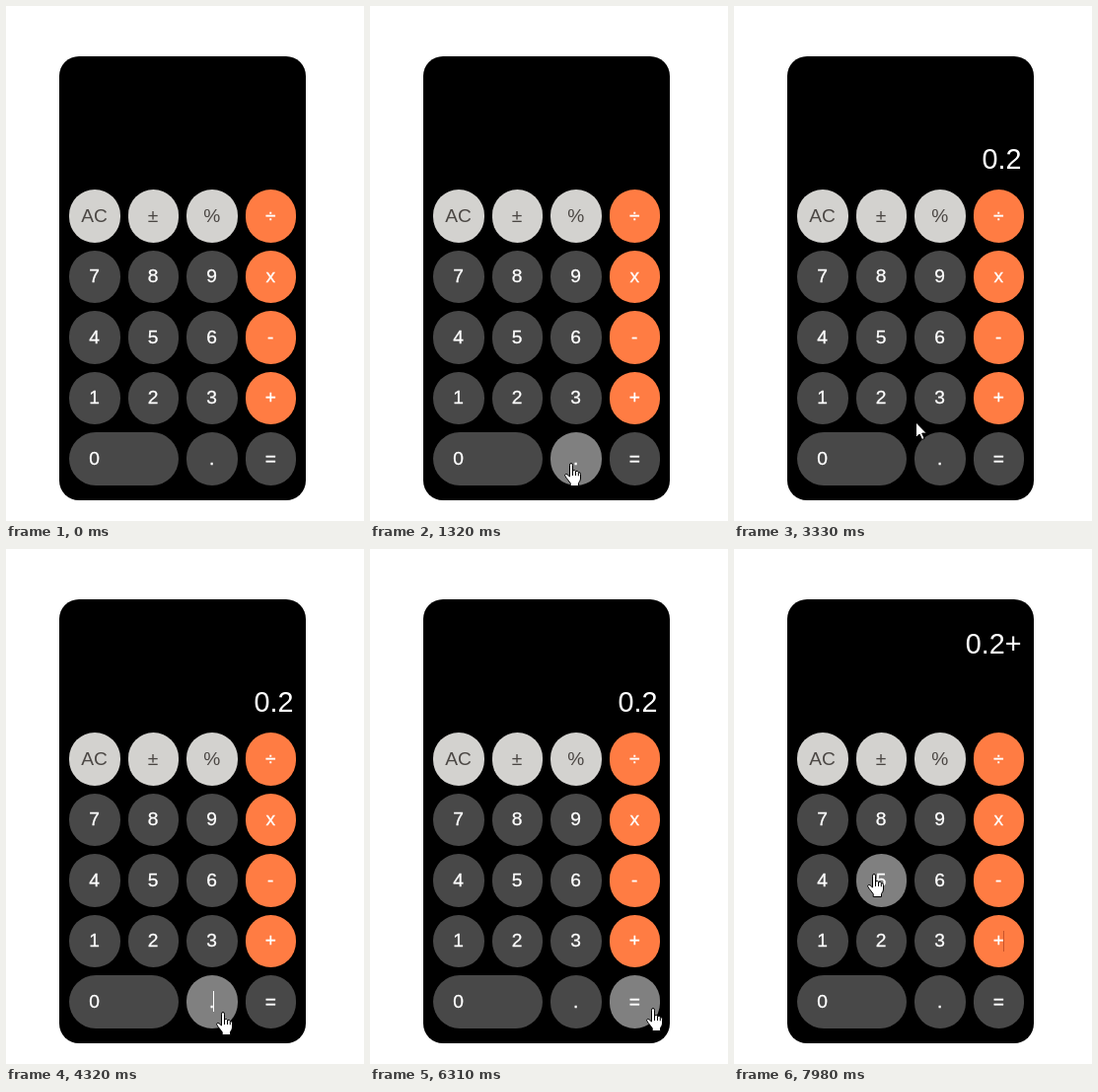
Recreate the animation shown at these times as an HTML page. Size 363 by 522 pixels, loop 8000 ms.

```html
<!DOCTYPE html>
<html lang="en">
<head>
<meta charset="utf-8">
<title>Calculator</title>
<style>
  html, body { margin: 0; width: 100%; height: 100%; overflow: hidden; background: #fff; }
  svg { display: block; width: 363px; height: 522px; }
  text { font-family: "Liberation Sans", Arial, sans-serif; }
  .key { font-size: 19.2px; fill: #fff; stroke: #fff; stroke-width: .3; }
  .key.light { fill: #4b4744; stroke: none; }
  .display { font-size: 28.8px; fill: #fff; text-anchor: end; }
</style>
</head>
<body>
<svg id="stage" viewBox="0 0 363 522">
  <rect x="54" y="51" width="250" height="450" rx="20"/>
  <g id="keys"></g>
  <text id="previous" class="display" x="291.5" y="106"></text>
  <text id="current" class="display" x="291.5" y="165"></text>
  <rect id="dotCaret" x="210" y="448" width="1" height="21" fill="#fff"/>
  <rect id="plusCaret" x="273" y="387" width="1" height="21" fill="#c8532a"/>
  <g id="arrow">
    <path d="M.5 .9V16.4L4.1 13 6.6 18.5 9.1 17.4 6.7 12.1H11.4Z" fill="#fff" stroke="#000"/>
  </g>
  <g id="hand" fill="#fff" stroke="#000" stroke-linejoin="round">
    <path d="M5.5 14V2.2Q5.5 .5 7 .5T8.5 2.2V8Q11 6.6 11.5 8.6 14 7.6 14.3 9.6 16.5 9.2 16.5 11.5V16Q16.5 18 14.5 20.5V23.5H6.2V20.6L2.2 15.4Q.5 13 .6 12.2 1.6 10.6 3.2 12Z"/>
    <path d="M8.5 8V13M11.5 8.8V13M14.3 9.8V13.3" fill="none"/>
  </g>
  <circle id="click" r="12" fill="#ff0" fill-opacity=".47"/>
</svg>
<script>
const LOOP = 8000;
const SVG = "http://www.w3.org/2000/svg";
const $ = id => document.getElementById(id);
const COLORS = { light: "#d3d2cf", dark: "#484848", orange: "#ff7c43", hover: "#808080" };

// start, cursor, x, y, hovered key, mouse down
const pointer = [
  [0, ""],
  [330, "arrow", 312, 482],
  [660, "hand", 257, 402, "+"],
  [990, "arrow", 165, 451],
  [1320, "hand", 197, 463, "."],
  [1650, "hand", 198, 464, ".", true],
  [1990, "hand", 198, 464, "."],
  [2320, "arrow", 177, 413],
  [2650, "hand", 144, 405, "2", true],
  [2980, "hand", 144, 405, "2"],
  [3330, "arrow", 184, 421],
  [3660, "hand", 213, 469, "."],
  [3990, "hand", 213, 469, ".", true],
  [4320, "hand", 213, 469, "."],
  [4650, "hand", 213, 469, ".", true],
  [4980, "hand", 213, 469, "."],
  [6310, "hand", 280, 465, "="],
  [6640, "arrow", 319, 427],
  [6970, "hand", 270, 398, "+", true],
  [7300, "hand", 270, 398, "+"],
  [7630, "arrow", 167, 338],
  [7980, "hand", 135, 329, "5"]
];
const currentText = [[0, ""], [1990, "."], [2980, "0.2"], [7300, ""]];
const previousText = [[0, ""], [7300, "0.2+"]];
const dotCaret = [[0, false], [3990, true], [4650, false], [5310, true], [6310, false], [6640, true], [7300, false]];
const plusCaret = [[0, false], [7300, true], [7630, false], [7980, true]];

const at = (steps, t) => steps.findLast(step => step[0] <= t);
const show = (node, visible) => node.setAttribute("visibility", visible ? "visible" : "hidden");
const keys = {};

function add(tag, attrs) {
  const node = document.createElementNS(SVG, tag);
  for (const name in attrs) node.setAttribute(name, attrs[name]);
  return $("keys").appendChild(node);
}

function addKey(label, row, col, span = 1) {
  const left = Math.round(64 + col * 59.5);
  const right = Math.round(64 + (col + span) * 59.5 - 8);
  const top = Math.round(186 + row * 61.6);
  const bottom = Math.round(239.6 + row * 61.6);
  const kind = col === 3 && row < 4 ? "orange" : row ? "dark" : "light";
  const face = add("rect", {
    x: left, y: top, width: right - left, height: bottom - top,
    rx: Math.min(right - left, bottom - top) / 2
  });
  add("text", {
    class: "key " + kind, "text-anchor": "middle",
    x: 89.5 + col * 59.6, y: Math.floor(219.2 + row * 61.5)
  }).textContent = label;
  keys[label] = { face, color: COLORS[kind] };
}

["AC ± % ÷", "7 8 9 x", "4 5 6 -", "1 2 3 +"].forEach((line, row) =>
  line.split(" ").forEach((label, col) => addKey(label, row, col)));
addKey("0", 4, 0, 2);
addKey(".", 4, 2);
addKey("=", 4, 3);

function render(t) {
  const [, cursor, x = 0, y = 0, hovered, pressed] = at(pointer, t);
  for (const label in keys) {
    const { face, color } = keys[label];
    face.setAttribute("fill", label === hovered ? COLORS.hover : color);
  }
  for (const name of ["arrow", "hand"]) {
    show($(name), name === cursor);
    $(name).setAttribute("transform", `translate(${x} ${y})`);
  }
  show($("click"), pressed);
  $("click").setAttribute("cx", x + 6);
  $("click").setAttribute("cy", y);
  $("current").textContent = at(currentText, t)[1];
  $("previous").textContent = at(previousText, t)[1];
  show($("dotCaret"), at(dotCaret, t)[1]);
  show($("plusCaret"), at(plusCaret, t)[1]);
}

const start = performance.now();
function tick() {
  render((performance.now() - start) % LOOP);
  requestAnimationFrame(tick);
}
tick();
</script>
</body>
</html>
```
